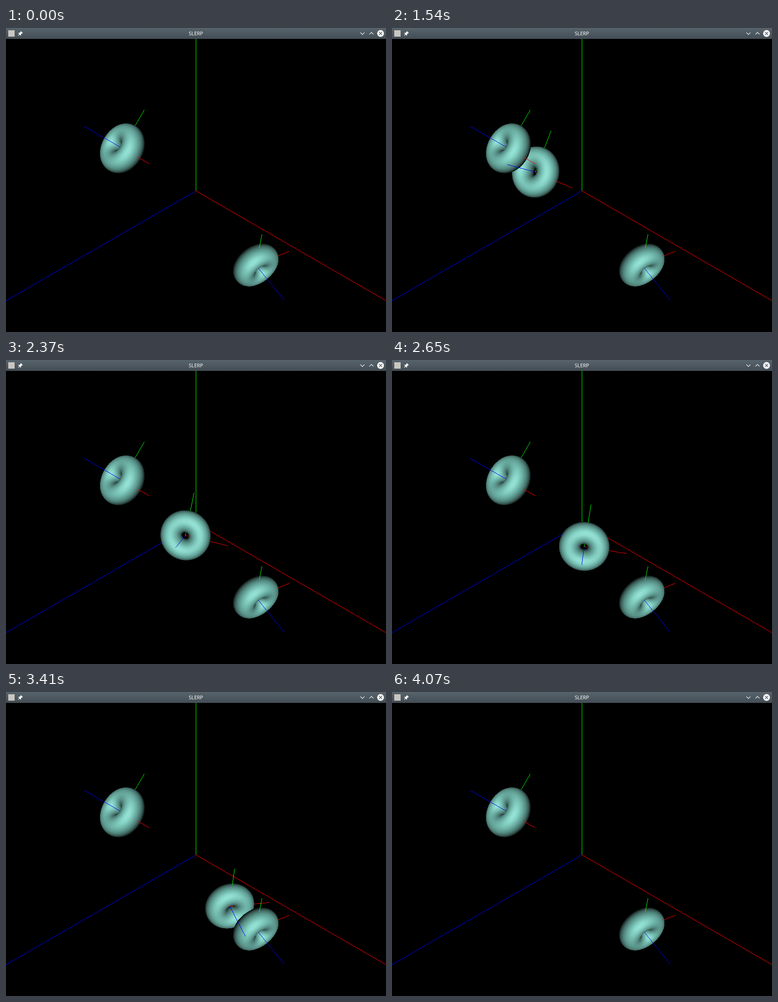
An HTML page with a canvas for the animation above (4.75 s loop, 837 by 669 pixels).

```html
<!DOCTYPE html>
<html lang="en">
<head>
<meta charset="utf-8">
<title>SLERP</title>
<style>
  html, body { margin: 0; width: 100%; height: 100%; overflow: hidden; background: #000; }
  canvas, svg { position: absolute; left: 0; top: 0; display: block; }
  text { font: 11px "Noto Sans", sans-serif; fill: #fcfcfc; }
</style>
</head>
<body>
<canvas id="view" width="837" height="669"></canvas>
<svg width="837" height="24" viewBox="0 0 837 24">
  <defs>
    <linearGradient id="bar" x2="0" y2="1">
      <stop offset="0" stop-color="#58646d"/>
      <stop offset="1" stop-color="#434d54"/>
    </linearGradient>
  </defs>
  <rect width="837" height="24" fill="url(#bar)"/>
  <rect x="5" y="5" width="14" height="14" fill="#c9c6c0"/>
  <g fill="#fcfcfc">
    <path d="M33 7l4 4-1 1-1-.2-2 2 .2 2-1 1-2.300-2.300-2.700 2.700-.7-.7 2.700-2.700-2.200-2.200 1-1 2 .2 2-2-.2-1z"/>
    <circle cx="825" cy="12" r="7.500"/>
  </g>
  <text x="418.300" y="16" text-anchor="middle">SLERP</text>
  <g fill="none" stroke="#fcfcfc" stroke-width="1.200">
    <path d="M780.500 9.800l4.500 4.500 4.500-4.500M800.500 14.200l4.500-4.500 4.500 4.500"/>
    <path d="M821.500 8.500l7 7m0-7l-7 7" stroke="#475057"/>
  </g>
</svg>
<script>
const W = 837, H = 669, LOOP = 4750;
const CX = 418.5, CY = 358.5, FOCAL = H / 2 * Math.sqrt(3);
const EYE = 1.5 * Math.sqrt(3);              // camera sits at (1.5, 1.5, 1.5)
const RING = 0.1, TUBE = 0.075, AXIS = 0.3;
const rgb = (r, g, b) => (255 << 24 | b << 16 | g << 8 | r) >>> 0;
const RED = rgb(255, 0, 0), GREEN = rgb(0, 255, 0), BLUE = rgb(0, 0, 255);

// step number, time in ms, progress
const keys = [
  [1, 950, .0165], [2, 990, .031], [11, 1440, .168], [13, 1540, .197],
  [22, 2000, .349], [23, 2050, .3645], [33, 2560, .528], [35, 2650, .558],
  [44, 3080, .694], [51, 3410, .798], [56, 3650, .871], [64, 4070, 1]
];
const mix = (a, b, t) => a + (b - a) * t;
const steps = [];
for (let k = 1, j = 0; k <= 64; k++) {
  while (j < keys.length - 2 && k > keys[j + 1][0]) j++;
  const [k0, ms0, p0] = keys[j], [k1, ms1, p1] = keys[j + 1];
  const u = (k - k0) / (k1 - k0);
  steps.push({ at: Math.round((mix(ms0, ms1, u) - 1) / 10) * 10, p: mix(p0, p1, u) });
}

const ctx = document.getElementById("view").getContext("2d");
const image = ctx.createImageData(W, H);
const color = new Uint32Array(image.data.buffer);
const depth = new Float32Array(W * H);       // holds 1 / distance

// world vector to camera frame: right, up, toward the viewer
const turn = ([x, y, z]) => [
  (x - z) / Math.SQRT2, (2 * y - x - z) / Math.sqrt(6), (x + y + z) / Math.sqrt(3)
];
const project = ([x, y, z]) => {
  const w = 1 / (EYE - z);
  return [CX + FOCAL * x * w, CY - FOCAL * y * w, w];
};

function plot(x, y, w, c) {
  if (x < 0 || y < 0 || x >= W || y >= H) return;
  const i = y * W + x;
  if (w > depth[i]) { depth[i] = w; color[i] = c; }
}

function line(from, to, c) {
  let a = project(from), b = project(to);
  const m = Math.abs(b[0] - a[0]) >= Math.abs(b[1] - a[1]) ? 0 : 1, n = 1 - m;
  if (a[m] > b[m]) [a, b] = [b, a];
  for (let i = Math.ceil(a[m] - .5); i < b[m] - .5; i++) {
    const t = (i + .5 - a[m]) / (b[m] - a[m]);
    const j = Math.floor(mix(a[n], b[n], t)), w = mix(a[2], b[2], t);
    m ? plot(j, i, w, c) : plot(i, j, w, c);
  }
}

function shade(light) {
  const d = Math.max(0, light), s = 28 * d ** 12;
  return rgb(8 + 112 * d + s, 9 + 189 * d + s, 9 + 176 * d + s);
}

function axesOf([w, x, y, z]) {
  return [
    [1 - 2 * (y * y + z * z), 2 * (x * y + w * z), 2 * (x * z - w * y)],
    [2 * (x * y - w * z), 1 - 2 * (x * x + z * z), 2 * (y * z + w * x)],
    [2 * (x * z + w * y), 2 * (y * z - w * x), 1 - 2 * (x * x + y * y)]
  ];
}

// sphere-traces one torus lying across its local z axis
function torus({ q, pos }) {
  const [ax, ay, az] = axesOf(q).map(turn);
  const c = turn(pos), [sx, sy] = project(c);
  const toLocal = (x, y, z) => [ax, ay, az].map(e => e[0] * x + e[1] * y + e[2] * z);
  const [ox, oy, oz] = toLocal(-c[0], -c[1], EYE - c[2]);
  const far = Math.hypot(ox, oy, oz) + .2, near = far - .4;
  for (let py = Math.floor(sy - 72); py < sy + 72; py++) {
    for (let px = Math.floor(sx - 72); px < sx + 72; px++) {
      const vx = (px + .5 - CX) / FOCAL, vy = (CY - py - .5) / FOCAL;
      const len = Math.hypot(vx, vy, 1);
      const [dx, dy, dz] = toLocal(vx / len, vy / len, -1 / len);
      for (let n = 0, t = near; n < 70 && t < far; n++) {
        const x = ox + dx * t, y = oy + dy * t, z = oz + dz * t;
        const rho = Math.sqrt(x * x + y * y), k = rho - RING;
        const gap = Math.sqrt(k * k + z * z) - TUBE;
        if (gap < .0002) {
          const f = k / rho;
          plot(px, py, len / t, shade((x * f * ax[2] + y * f * ay[2] + z * az[2]) / TUBE));
          break;
        }
        t += gap;
      }
    }
  }
  [[ax, RED], [ay, GREEN], [az, BLUE]].forEach(([e, col]) =>
    line(c, c.map((v, i) => v + AXIS * e[i]), col));
}

// each end pose lies one unit out along its own z axis
const pose = q => ({ q, pos: axesOf(q)[2] });
const rad = Math.PI / 180;
const first = pose([Math.cos(22.5 * rad), -Math.sin(22.5 * rad), 0, 0]);
const last = pose([Math.cos(35 * rad), 0, Math.sin(35 * rad), 0]);

function between(t) {
  const angle = Math.acos(first.q.reduce((s, v, i) => s + v * last.q[i], 0));
  const a = Math.sin((1 - t) * angle) / Math.sin(angle);
  const b = Math.sin(t * angle) / Math.sin(angle);
  return {
    q: first.q.map((v, i) => a * v + b * last.q[i]),
    pos: first.pos.map((v, i) => mix(v, last.pos[i], t))
  };
}

color.fill(rgb(0, 0, 0));
line([0, 0, 0], turn([2, 0, 0]), RED);
line([0, 0, 0], turn([0, 2, 0]), GREEN);
line([0, 0, 0], turn([0, 0, 2]), BLUE);
torus(first);
torus(last);
const baseColor = color.slice(), baseDepth = depth.slice();

const start = performance.now();
let shown = -1;
function tick() {
  const now = (performance.now() - start) % LOOP;
  const step = steps.filter(s => s.at <= now).length;
  if (step !== shown) {
    shown = step;
    color.set(baseColor);
    depth.set(baseDepth);
    if (step > 0 && step < steps.length) torus(between(steps[step - 1].p));
    ctx.putImageData(image, 0, 0);
  }
  requestAnimationFrame(tick);
}
tick();
</script>
</body>
</html>
```
